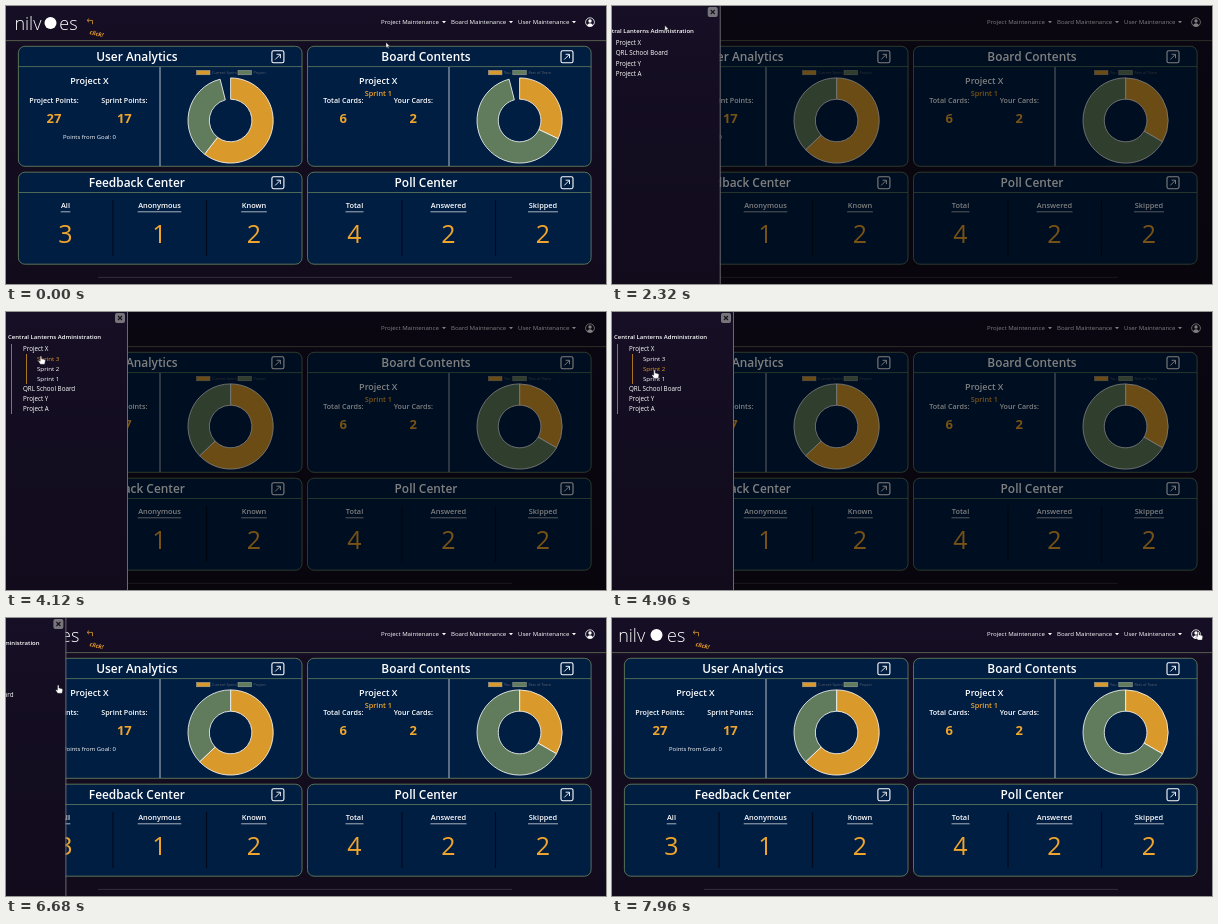
Animation of 600 by 278 pixels, one loop 8 s. Source, as an HTML page:

```html
<!DOCTYPE html>
<html lang="en">
<head>
<meta charset="utf-8">
<title>Project dashboard</title>
<style>
  html, body { margin: 0; width: 100%; height: 100%; overflow: hidden; background: #130c1f; }
  body { font-family: "Open Sans", "Noto Sans", sans-serif; color: #fff; }
  svg { position: absolute; left: 0; top: 0; font-family: inherit; }
  text { fill: #fff; }
  .semi { font-weight: 600; }
  .gold { fill: #f0a52c; }
  #backdrop { position: absolute; width: 600px; height: 278px; background: #000; }
  #sidebar {
    position: absolute; left: 0; top: 0; width: 122px; height: 278px; box-sizing: border-box;
    background: linear-gradient(#160f25, #110b1c); border-right: 1px solid #6a6870; overflow: hidden;
    white-space: nowrap;
  }
  #org { position: absolute; left: 2px; top: 20px; font-size: 6px; line-height: 10px; font-weight: 600; }
  #tree { position: absolute; left: 4.5px; top: 32.2px; border-left: 1px solid #77747c; padding-left: 11.5px; }
  .project { font-size: 6.25px; line-height: 10.3px; height: 10.3px; }
  .sprints { margin-left: 3px; border-left: 1px solid #a8741f; padding-left: 10px; overflow: hidden; }
  .sprint { font-size: 6.15px; line-height: 9.7px; height: 9.7px; width: 23px; }
  #close {
    position: absolute; left: 109px; top: 1px; width: 10px; height: 10px; border-radius: 2px; background: #77757b;
  }
</style>
</head>
<body>
<svg id="page" width="600" height="278" viewBox="0 0 600 278"></svg>
<div id="backdrop"></div>
<div id="sidebar">
  <div id="close"><svg width="10" height="10"><path d="M3 3l4 4m0-4l-4 4" stroke="#17131c" stroke-width="1.1"/></svg></div>
  <div id="org">Central Lanterns Administration</div>
  <div id="tree"></div>
</div>
<svg width="600" height="278" viewBox="0 0 600 278">
  <g id="cursor" stroke="#222" stroke-width=".35" fill="#fff">
    <path id="arrow" d="M0 0V5.2L1.2 4.1L2 5.9L2.8 5.5L2 3.8H3.7Z"/>
    <path id="hand" d="M-.7 .5Q0-.5 .7 .5V3L3.6 3.7Q4.6 4 4.4 5.2L3.7 8.3H-.5L-2.6 5.3Q-2.4 4.2-.7 5.3Z"/>
  </g>
</svg>
<script>
const LOOP = 8000;
const RELOAD = 6849, FIRST_AGE = 553;
const OPEN = 2120, CLOSE = 6530;
const GOLD = '#d9992b', GREEN = '#617c5c';
const $ = id => document.getElementById(id);

// ---- static page ----
const text = (x, y, size, str, cls = '', anchor = 'middle', extra = '') =>
  `<text x="${x}" y="${y}" font-size="${size}" class="${cls}" text-anchor="${anchor}" ${extra}>${str}</text>`;
const line = (x1, y1, x2, y2, color, width = .8) =>
  `<path d="M${x1} ${y1}L${x2} ${y2}" stroke="${color}" stroke-width="${width}"/>`;

function card(x, y, height, title) {
  const iconX = x + 253.5, iconY = y + 4.5;
  return `<rect x="${x}" y="${y}" width="283.6" height="${height}" rx="6.5" fill="#001d42" stroke="${GREEN}" stroke-width=".9"/>`
    + line(x, y + 20.3, x + 283.6, y + 20.3, GREEN)
    + text(x + 118.5, y + 14.3, 11.9, title, 'semi')
    + `<g fill="none" stroke="#fff"><rect x="${iconX}" y="${iconY}" width="12" height="12" rx="1.6" stroke-width="1.1"/>
       <path d="M${iconX + 3.3} ${iconY + 8.7}l5-5m-3.7-.2h3.9v3.9" stroke-width=".9"/></g>`;
}

const stat = (x, label, value) =>
  text(x, 97.3, 7.15, label, 'semi') + text(x, 116.6, 13, value, 'gold', 'middle', 'font-weight="700"');

function legend(x, y, color, label) {
  return `<rect x="${x}" y="${y}" width="13.5" height="4.4" fill="${color}" stroke="#a9a9a0" stroke-width=".5"/>`
    + text(x + 15.6, y + 3.7, 3.75, label, '', 'start', 'style="fill:#5d6570"');
}

// Three counters separated by dark rules
function counters(x, items) {
  return [47.5, 141.5, 236].map((dx, i) => {
    const [label, value, half] = items[i];
    return text(x + dx, 202, 7.4, label, 'semi')
      + line(x + dx - half, 205.8, x + dx + half, 205.8, '#d5d8de', .8)
      + text(x + dx, 237.2, 25, value, 'gold');
  }).join('') + line(x + 95, 194, x + 95, 250, '#000a1c', 1.1) + line(x + 188.5, 194, x + 188.5, 250, '#000a1c', 1.1);
}

const navItem = (x, caretX, label) =>
  text(x, 18.4, 6.05, label, '', 'start') + `<path d="M${caretX - 2} 15h4l-2 2.2z" fill="#fff"/>`;

$('page').innerHTML = `
  <defs><linearGradient id="bg" x2="0" y2="1"><stop stop-color="#150e24"/><stop offset="1" stop-color="#110b1b"/></linearGradient></defs>
  <rect width="600" height="278" fill="url(#bg)"/>`
  + line(0, 34.6, 600, 34.6, '#5c6650', .9)
  + text(36, 23.5, 18, 'nilv', '', 'end', 'id="brandLeft" font-weight="300"')
  + '<circle cx="44.5" cy="17" r="6" fill="#fff"/>'
  + text(53.5, 23.5, 18, 'es', '', 'start', 'id="brandRight" font-weight="300"')
  + `<path d="M86.5 18.2V14.4H81.2m1.9-1.9l-2 1.9l2 1.9" fill="none" stroke="${GOLD}" stroke-width=".8"/>`
  + text(83.2, 28, 5.8, 'click!', 'gold', 'start', 'font-weight="700" font-style="italic" transform="rotate(13 83.2 28)"')
  + navItem(375, 438, 'Project Maintenance')
  + navItem(445, 505, 'Board Maintenance')
  + navItem(512, 568, 'User Maintenance')
  + `<circle cx="584" cy="16.2" r="4.4" fill="none" stroke="#fff" stroke-width=".8"/>
     <circle cx="584" cy="15" r="1.7" fill="#fff"/><path d="M580.8 19.2Q584 15.2 587.2 19.2Q584 22 580.8 19.2Z" fill="#fff"/>`
  + card(12.4, 40.3, 120, 'User Analytics')
  + card(301.5, 40.3, 120, 'Board Contents')
  + card(12.4, 166.2, 92, 'Feedback Center')
  + card(301.5, 166.2, 92, 'Poll Center')
  + line(154, 61, 154, 160, '#e6e9ee') + line(443, 61, 443, 160, '#e6e9ee')
  + text(83.5, 77.7, 9, 'Project X', 'semi')
  + stat(48, 'Project Points:', 27) + stat(118.3, 'Sprint Points:', 17)
  + text(83.5, 133.4, 5.95, 'Points from Goal: 0')
  + text(372.3, 77.7, 9, 'Project X', 'semi')
  + text(372.3, 89.8, 7.3, 'Sprint 1', 'gold semi')
  + stat(337.3, 'Total Cards:', 6) + stat(407.3, 'Your Cards:', 2)
  + legend(190.5, 64.4, GOLD, 'Current Sprint') + legend(232, 64.4, GREEN, 'Project')
  + legend(482.5, 64.4, GOLD, 'You') + legend(506.8, 64.4, GREEN, 'Rest of Team')
  + counters(12, [['All', 3, 4.8], ['Anonymous', 1, 21.8], ['Known', 2, 12.8]])
  + counters(301, [['Total', 4, 9], ['Answered', 2, 18], ['Skipped', 2, 15]])
  + line(92, 271.4, 506, 271.4, '#3d3843')
  + ['userGold', 'userGreen', 'boardGold', 'boardGreen'].map(id =>
      `<path id="${id}" fill="${id.endsWith('Gold') ? GOLD : GREEN}" stroke="#fff" stroke-width=".8" stroke-linejoin="round"/>`).join('');

// ---- sidebar tree ----
const projects = [
  { name: 'Project X', sprints: [3, 2, 1], opens: 3560 },
  { name: 'QRL School Board', sprints: [] },
  { name: 'Project Y', sprints: [4, 2, 1], opens: 5420 },
  { name: 'Project A', sprints: [] },
];
$('tree').innerHTML = projects.map(p => `<div class="project">${p.name}</div>` + (p.sprints.length
  ? `<div class="sprints">${p.sprints.map(n => `<div class="sprint">Sprint ${n}</div>`).join('')}</div>` : '')).join('');
const branches = [...document.querySelectorAll('.sprints')];
const branchOpens = projects.filter(p => p.opens).map(p => p.opens);
const sprintRows = [...document.querySelectorAll('.sprint')];

// ---- motion ----
const clamp = v => Math.min(1, Math.max(0, v));
const progress = (t, start, length) => clamp((t - start) / length);
const easeInOut = p => p * p * (3 - 2 * p);
const easeOut = p => 1 - (1 - p) ** 2;
const easeOutQuart = p => 1 - (1 - p) ** 4;

// time, x, y of the pointer's hot spot
const route = [
  [0, 380, 36.5], [800, 378, 35], [1320, 371.5, 31], [1500, 360, 29], [1980, 58, 19], [2250, 54, 19],
  [2800, 30, 30], [3240, 27, 31], [3480, 30, 37], [3750, 30, 38], [4500, 40, 50], [4960, 42.5, 58],
  [5320, 33, 86], [5600, 33, 87], [6160, 44, 73], [6400, 42, 67], [6620, 44, 67], [7080, 215.5, 67.5],
  [7300, 260, 62], [7850, 583, 15], [8000, 587, 13.5],
];
const handTimes = [[1960, 2300], [3450, 6720], [7820, 8000]];

function pointerAt(t) {
  const i = Math.max(1, route.findIndex(([time]) => time > t));
  const [t0, x0, y0] = route[i - 1], [t1, x1, y1] = route[i];
  const k = easeInOut(progress(t, t0, t1 - t0));
  return [x0 + (x1 - x0) * k, y0 + (y1 - y0) * k];
}

function ringSegment(cx, from, to) {
  if (to - from < .001) return '';
  const cy = 114.5, outer = 42.6, inner = 21.3, large = to - from > .5 ? 1 : 0;
  const at = (r, turn) => {
    const a = turn * 2 * Math.PI;
    return `${cx + r * Math.sin(a)} ${cy - r * Math.cos(a)}`;
  };
  return `M${at(outer, from)}A${outer} ${outer} 0 ${large} 1 ${at(outer, to)}`
    + `L${at(inner, to)}A${inner} ${inner} 0 ${large} 0 ${at(inner, from)}Z`;
}

function donut(name, cx, share, grown) {
  $(name + 'Gold').setAttribute('d', ringSegment(cx, 0, share * grown));
  $(name + 'Green').setAttribute('d', ringSegment(cx, share * grown, grown));
}

function render(t) {
  const age = t < RELOAD ? t + FIRST_AGE : t - RELOAD;
  const grown = easeOutQuart(clamp(age / 1000));
  donut('user', 224.6, 17 / 27, grown);
  donut('board', 513.6, 1 / 3, grown);

  const spread = easeInOut(progress(age, 250, 800));
  $('brandLeft').setAttribute('x', 36.5 - 3.3 * spread);
  $('brandRight').setAttribute('x', 52.5 + 2.5 * spread);

  $('backdrop').style.opacity = .5 * (progress(t, OPEN, 150) - progress(t, CLOSE, 150));
  const shown = easeOut(progress(t, OPEN, 300)) - easeInOut(progress(t, CLOSE, 300));
  $('sidebar').style.transform = `translateX(${-122 * (1 - shown)}px)`;
  branches.forEach((el, i) => el.style.height = 29.1 * easeInOut(progress(t, branchOpens[i], 300)) + 'px');

  const [x, y] = pointerAt(t);
  for (const row of sprintRows) {
    const box = row.getBoundingClientRect();
    const clip = row.parentNode.getBoundingClientRect();
    const hovered = x >= box.left && x <= box.right && y >= box.top && y < Math.min(box.bottom, clip.bottom);
    row.style.color = hovered ? '#e09a25' : '';
  }
  const hand = handTimes.some(([from, to]) => t >= from && t < to);
  $('cursor').setAttribute('transform', `translate(${x} ${y})`);
  $('hand').setAttribute('visibility', hand ? 'visible' : 'hidden');
  $('arrow').setAttribute('visibility', hand ? 'hidden' : 'visible');
}

const start = performance.now();
function tick() {
  render((performance.now() - start) % LOOP);
  requestAnimationFrame(tick);
}
tick();
</script>
</body>
</html>
```
